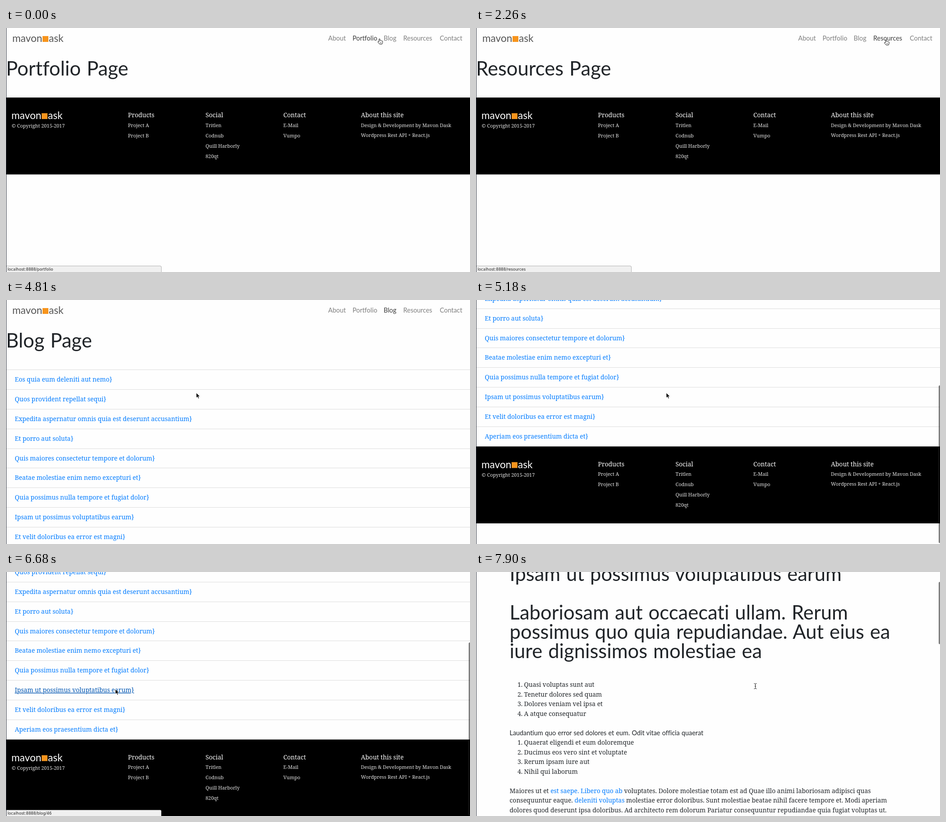
Recreate the animation shown at these times as an HTML page. Size 1029 px wide and 544 px high, loop 8 s.

```html
<!DOCTYPE html>
<html lang="en">
<head>
<meta charset="utf-8">
<title>Portfolio site</title>
<style>
  html, body { margin: 0; width: 100%; height: 100%; overflow: hidden; background: #fefefe; }
  svg { display: block; width: 100vw; height: 100vh; }
  text { white-space: pre; font-variant-ligatures: none; }
  .h1, .nav, .sans, .logo { font-family: Lato, sans-serif; word-spacing: .04em; fill: #212529; }
  .h1 { font-size: 43.6px; }
  .nav { font-size: 14.4px; fill: #7f7f7f; }
  .nav.on { fill: #3c3c3c; }
  .sans { font-size: 14.4px; }
  .logo { font-size: 22.6px; fill: #555; }
  .serif, .item, .head, .small { font-family: "Noto Serif", serif; font-size: 13.93px; fill: #212529; }
  .item, .link { fill: #007bff; }
  .item.hot { fill: #0056b3; text-decoration: underline; }
  .head { fill: #fff; }
  .small { font-size: 10.9px; fill: #e6e6e6; }
  .foot .logo { fill: #fff; }
  .status { font: 8.5px "DejaVu Sans", sans-serif; fill: #222; }
</style>
</head>
<body>
<svg viewBox="0 0 1029 544" xmlns="http://www.w3.org/2000/svg"></svg>
<script>
const LOOP = 8000, VIEW = 544, ROW = 43.88;
const svg = document.querySelector('svg');

const text = (x, y, cls, s) => `<text x="${x}" y="${y}" class="${cls}">${s}</text>`;
const column = (x, y, gap, cls, lines) =>
  lines.map((s, i) => text(x, y + i * gap, cls, s)).join('');
const logo = (x, y) => text(x, y, 'logo', 'mavon') +
  `<rect x="${x + 67}" y="${y - 13}" width="13" height="13" fill="#f7941d"/>` +
  text(x + 81, y, 'logo', 'ask');

const nav = { About: 714.5, Portfolio: 768.5, Blog: 837.5, Resources: 881, Contact: 962 };
const posts = [
  'Eos quia eum deleniti aut nemo', 'Quos provident repellat sequi',
  'Expedita aspernatur omnis quia est deserunt accusantium', 'Et porro aut soluta',
  'Quis maiores consectetur tempore et dolorum', 'Beatae molestiae enim nemo excepturi et',
  'Quia possimus nulla tempore et fugiat dolor', 'Ipsam ut possimus voluptatibus earum',
  'Et velit doloribus ea error est magni', 'Aperiam eos praesentium dicta et'
];

// Footer, drawn from its own top edge
const footColumn = (x, title, gap, lines) =>
  text(x, 44, 'head', title) + column(x, 65.5, gap, 'small', lines);
const footer = '<rect x="0" width="1029" height="171.5"/>' + logo(12, 48) +
  text(12.5, 67, 'small', '© Copyright 2015-2017') +
  footColumn(270.5, 'Products', 23.1, ['Project A', 'Project B']) +
  footColumn(442.5, 'Social', 23.1, ['Tritlen', 'Codnub', 'Quill Harborly', '820qt']) +
  footColumn(615, 'Contact', 23.1, ['E-Mail', 'Vumpo']) +
  footColumn(787, 'About this site', 22.3,
    ['Design &amp; Development by Mavon Dask', 'Wordpress Rest API + React.js']);

const list = posts.map((s, i) =>
  `<path d="M0 ${Math.round(155 + i * ROW) + .5}H1029" stroke="#dcdcdc"/>` +
  text(19.5, 182 + i * ROW, 'item', s + '}')).join('');

const link = s => `<tspan class="link">${s}</tspan>`;
const numbered = (y, lines) => column(92, y, 21.5, 'serif', ['1.', '2.', '3.', '4.']) +
  column(106.5, y, 21.5, 'serif', lines);
const article = column(74.5, 105.5, 86, 'h1', ['Ipsam ut possimus voluptatibus earum']) +
  column(74.5, 191.5, 43, 'h1', ['Laboriosam aut occaecati ullam. Rerum',
    'possimus quo quia repudiandae. Aut eius ea', 'iure dignissimos molestiae ea']) +
  numbered(342, ['Quasi voluptas sunt aut', 'Tenetur dolores sed quam',
    'Dolores veniam vel ipsa et', 'A atque consequatur']) +
  text(74.5, 449.5, 'sans', 'Laudantium quo error sed dolores et eum. Odit vitae officia quaerat') +
  numbered(471, ['Quaerat eligendi et eum doloremque', 'Ducimus eos vero sint et voluptate',
    'Rerum ipsam iure aut', 'Nihil qui laborum']) +
  column(74.5, 578.5, 21.5, 'serif', [
    `Maiores ut et ${link('est saepe. Libero quo ab')} voluptates. Dolore molestiae totam est ad Quae illo animi laboriosam adipisci quas`,
    `consequuntur eaque. ${link('deleniti voluptas')} molestiae error doloribus. Sunt molestiae beatae nihil facere tempore et. Modi aperiam`,
    'dolores quod deserunt ipsa doloribus. Ad architecto rem dolorum Pariatur consequuntur repudiandae quia fugiat voluptas ut.']);

const cursors = {
  hand: '<path d="M3.2 7.5V1.6Q4.3 0 5.4 1.6V5Q6.6 4.2 7.4 5.2Q8.7 4.6 9.4 5.7Q11 5.4 11.2 7V9.5L9.8 13H4.6L.8 8.6Q.5 6.8 2 7Z" fill="#fff" stroke="#111" stroke-linejoin="round"/><path d="M5.8 8.5V11M7.9 8.5V11" stroke="#111" stroke-width=".7"/>',
  arrow: '<path d="M0 0V11.2L2.6 8.8L4.4 13L6.3 12.2L4.5 8.1H8Z" stroke="#fff" stroke-width=".8"/>',
  beam: '<path d="M-3 -6Q0 -6 0 -4Q0 -6 3 -6M0 -5V5M-3 6Q0 6 0 4Q0 6 3 6M-1.5 0H1.5" fill="none" stroke="#222"/>'
};

svg.innerHTML = `
  <g id="page">
    ${logo(14, 31)}
    ${Object.entries(nav).map(([s, x]) => text(x, 28, 'nav', s)).join('')}
    ${text(0, 105.5, 'h1" id="title', '')}
    <g id="list">${list}</g>
    <g id="article">${article}</g>
    <g id="foot" class="foot">${footer}</g>
  </g>
  <rect id="bar" x="1026" width="5" rx="2.5" fill-opacity=".5" stroke="#fff" stroke-opacity=".15"/>
  <g id="status">
    <path d="M0 530.5H342Q344.5 530.5 344.5 533V545H0Z" fill="#f0f0f0"/>
    <path d="M0 530.5H342Q344.5 530.5 344.5 533V545" fill="none" stroke="#000" stroke-opacity=".28"/>
    ${text(3.5, 541, 'status" id="url', '')}
  </g>
  <rect width="1" height="544" fill="#2b303b"/>
  <g id="cursor"></g>`;

const el = id => document.getElementById(id);
const links = [...svg.querySelectorAll('.nav')];
const items = [...svg.querySelectorAll('.item')];
const show = (id, on) => el(id).setAttribute('display', on ? 'inline' : 'none');

// Timeline: each step changes part of the state and holds until the next
const steps = [];
const at = (t, patch) => steps.push([t, patch]);
function glide(t0, t1, n, from, to) {
  for (let i = 1; i <= n; i++) {
    const k = i / n, e = k * k * (3 - 2 * k);
    at(t0 + (t1 - t0) * (i - 1) / (n - 1),
      { x: from[0] + (to[0] - from[0]) * e, y: from[1] + (to[1] - from[1]) * e });
  }
}

at(0, { page: 'Portfolio', on: 'Portfolio', url: 'portfolio', cursor: 'hand', x: 824, y: 23,
        scroll: 0, bar: false, list: false, hot: -1 });
at(90, { x: 838, y: 24 });
at(270, { x: 847, y: 25, on: 'Portfolio Blog', url: 'blog' });
at(810, { on: 'Blog' });
at(900, { page: 'Blog' });
at(1000, { list: true });
glide(1100, 1400, 4, [847, 25], [905, 25]);
at(1300, { on: 'Blog Resources', url: 'resources' });
at(2180, { on: 'Resources' });
at(2260, { page: 'Resources', list: false });
at(2500, { x: 980, y: 25, on: 'Resources Contact', url: 'contact' });
at(3150, { on: 'Contact' });
at(3270, { page: 'Contact' });
glide(3540, 4040, 6, [980, 25], [848, 25]);
at(3640, { on: 'Contact Resources', url: 'resources' });
at(3940, { on: 'Contact Blog', url: 'blog' });
at(4160, { on: 'Blog' });
at(4250, { page: 'Blog' });
at(4340, { list: true, cursor: 'arrow', x: 808, y: 47 });
at(4450, { url: '' });
glide(4450, 4810, 5, [808, 47], [422, 207]);
at(4980, { scroll: 110, bar: true });
at(5080, { scroll: 225 });
at(5180, { scroll: 268 });
at(5330, { scroll: 241 });
at(5480, { scroll: 226 });
at(5630, { scroll: 222 });
for (let i = 1; i <= 7; i++)
  at(5770 + (i - 1) * 610 / 6, { scroll: 221 - 80 * Math.sin(Math.PI * i / 7) });
at(6680, { x: 242.5, y: 261, hot: 7, url: 'blog/46' });
at(6800, { page: '', list: false, on: '', url: '', hot: -1, scroll: 0, bar: false });
at(6980, { x: 334, y: 262 });
at(7130, { page: 'Post' });
at(7220, { cursor: 'beam', x: 619.5, y: 254.5 });
at(7810, { scroll: 40, bar: true });
at(7900, { scroll: 86 });
steps.sort((a, b) => a[0] - b[0]);

function draw(t) {
  const s = {};
  for (const [time, patch] of steps) if (time <= t) Object.assign(s, patch);
  const post = s.page === 'Post';

  el('page').setAttribute('transform', `translate(0 ${-s.scroll})`);
  el('title').textContent = s.page && !post ? s.page + ' Page' : '';
  show('list', s.list);
  show('article', post);
  show('foot', !post);
  const footTop = s.list ? 594.5 : s.page ? 155 : 112;
  el('foot').setAttribute('transform', `translate(0 ${footTop})`);
  const on = s.on.split(' ');
  links.forEach(a => a.classList.toggle('on', on.includes(a.textContent)));
  items.forEach((a, i) => a.classList.toggle('hot', i === s.hot));

  const height = post ? 2130 : 766, top = s.scroll / height * VIEW;
  show('bar', s.bar);
  el('bar').setAttribute('y', top);
  el('bar').setAttribute('height', Math.min(VIEW * VIEW / height, 542 - top));

  show('status', s.url);
  el('url').textContent = 'localhost:8888/' + s.url;
  el('cursor').innerHTML = cursors[s.cursor];
  el('cursor').setAttribute('transform', `translate(${s.x} ${s.y})`);
}

const start = performance.now();
function tick() {
  draw((performance.now() - start) % LOOP);
  requestAnimationFrame(tick);
}
tick();
</script>
</body>
</html>
```
